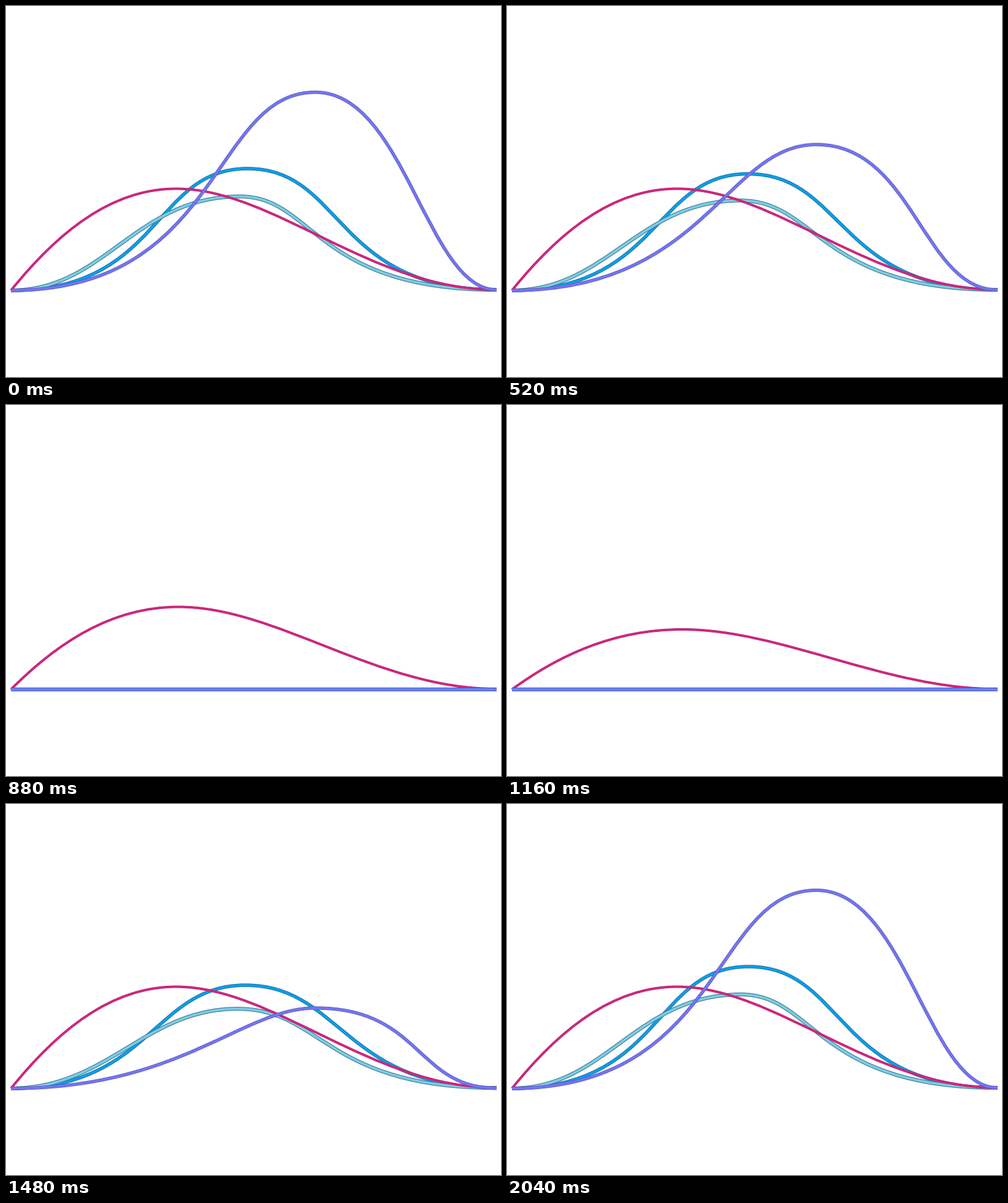
Write a matplotlib script that moves like this. It is 800 px wide and 600 px high and loops after 2160 ms.

```python
import numpy as np
import matplotlib.pyplot as plt
from matplotlib.animation import FuncAnimation
from matplotlib.colors import to_rgb
from matplotlib.patches import PathPatch
from matplotlib.path import Path

W, H, DPI = 800, 600, 100
FRAMES, STEP = 54, 40
BASE, LEFT, RIGHT = 460, 8, 793
CODES = [Path.MOVETO] + [Path.CURVE4] * 6

fig = plt.figure(figsize=(W / DPI, H / DPI), dpi=DPI, facecolor="white")
ax = fig.add_axes([0, 0, 1, 1])
ax.set(xlim=(0, W), ylim=(H, 0))
ax.axis("off")


def ease(x):
    """Slow start and a very steep finish."""
    s = 1 - (1 - np.clip(x, 0, 1)) ** (1 / 3)
    return s * s * (3 - 2 * s)


class Wave:
    """Two joined Bezier arcs that sink into the base line."""

    def __init__(self, color, edge, width, core, span, peak, xs, flat_xs,
                 lift=0, flat_color=None):
        self.start, self.end = span
        self.xs, self.flat_xs = np.array(xs, float), np.array(flat_xs, float)
        top = BASE - peak
        self.rise = np.array([0, lift, top, top, top, 1, 1], float)
        self.color = np.array(to_rgb(color))
        self.flat_color = np.array(to_rgb(flat_color or color))
        self.rim, self.line = (self.stroke(c, w)
                               for c, w in ((edge, width), (color, core)))

    def stroke(self, color, px):
        patch = PathPatch(Path(np.zeros((7, 2)), CODES), fill=False,
                          ec=color, lw=px * 72 / DPI, capstyle="butt")
        return ax.add_patch(patch)

    def update(self, i):
        p = ease((i - self.start) / (self.end - self.start))
        inner = self.xs + (self.flat_xs - self.xs) * p
        x = np.concatenate([[LEFT], inner, [RIGHT]])
        path = Path(np.column_stack([x, BASE - self.rise * (1 - p)]), CODES)
        self.rim.set_path(path)
        self.line.set_path(path)
        mix = np.clip((p - 0.9) / 0.1, 0, 1)
        self.line.set_edgecolor(self.color + (self.flat_color - self.color) * mix)
        return [self.rim, self.line]


waves = [
    Wave("#08a0e8", "#2a6c9c", 5.6, 3.8, (8.9, 21.3), 263,
         (252, 237, 390, 547, 528), (130, 245, 368, 510, 650)),
    Wave("#78d0e4", "#4a7a9c", 6.2, 3.8, (8.9, 21.3), 308,
         (160, 208, 378, 498, 498), (185, 320, 350, 590, 605)),
    Wave("#d4247e", "#a82c72", 4, 3, (15.8, 25.75), 295.5,
         (84, 170, 275, 433, 590), (84, 178, 295, 460, 640), lift=94),
    Wave("#7474f2", "#5858b0", 5.4, 4, (2.8, 17.2), 139.5,
         (350, 332, 500, 645, 680), (240, 415, 500, 690, 650),
         flat_color="#6482fa"),
]


def draw(k):
    i = min(k, FRAMES - 1 - k)
    return [a for w in waves for a in w.update(i)]


anim = FuncAnimation(fig, draw, frames=FRAMES, interval=STEP, repeat=True,
                     repeat_delay=0)
plt.show()
```
